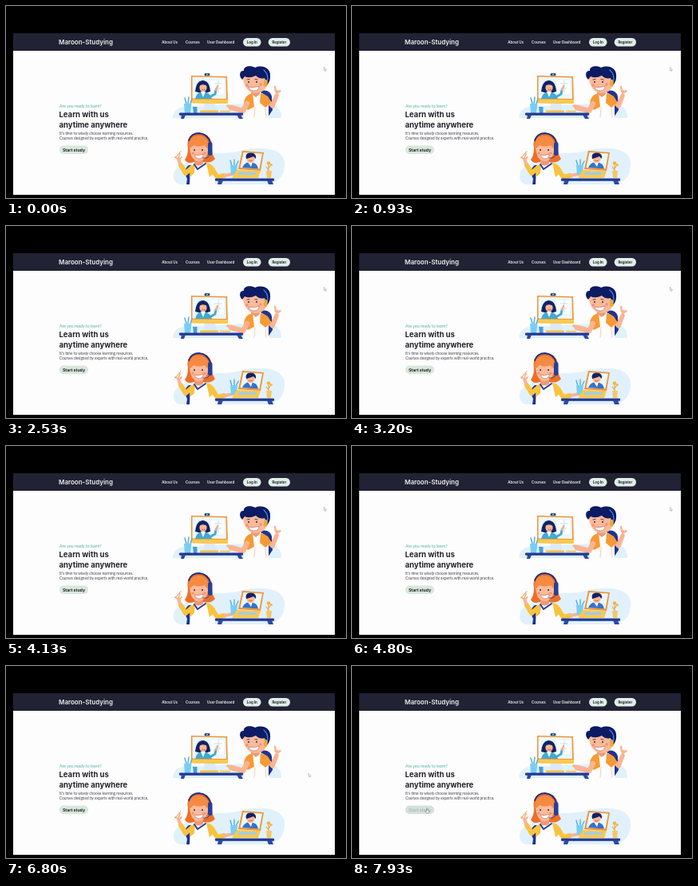
Animation, 426 px wide and 240 px high, one loop 8000 ms. Source, as an HTML page:

```html
<!DOCTYPE html>
<html lang="en">
<head>
<meta charset="utf-8">
<title>Learning page</title>
<style>
  html, body { margin: 0; width: 100%; height: 100%; overflow: hidden; background: #000; }
  svg { display: block; width: 100vw; height: 100vh; }
  text { font-family: Inter, "Open Sans", sans-serif; font-weight: 700; fill: #222228; }
  .nav { font-size: 4.4px; font-weight: 600; fill: #f4f4f6; }
  .pill { font-size: 4.4px; text-anchor: middle; }
  .small { font-family: Lato, "Open Sans", sans-serif; font-size: 4.75px; font-weight: 400; fill: #44444c; }
  .line { fill: none; stroke-linecap: round; stroke-linejoin: round; }
</style>
</head>
<body>
<svg viewBox="0 0 426 240">
  <rect width="426" height="240" fill="#000"/>
  <rect x="9" y="34" width="403" height="202" fill="#fdfdfe"/>

  <g id="header">
    <rect x="9" y="34" width="403" height="22" fill="#212233"/>
    <text x="66" y="48" font-size="8" style="fill:#f1f1f4;font-weight:600">Maroon-Studying</text>
    <text class="nav" x="195.3" y="46.8">About Us</text>
    <text class="nav" x="225" y="46.8">Courses</text>
    <text class="nav" x="252" y="46.8">User Dashboard</text>
    <rect x="297" y="40" width="22.5" height="10.5" rx="5.2" fill="#dfeee8"/>
    <text class="pill" x="308.2" y="46.8">Log In</text>
    <rect x="328.7" y="40" width="27.3" height="10.5" rx="5.2" fill="#dfeee8"/>
    <text class="pill" x="342.3" y="46.8">Register</text>
  </g>

  <g id="intro">
    <text class="small" x="67" y="126.6" style="font-size:5.2px;fill:#4fae9d">Are you ready to learn?</text>
    <text x="66.5" y="139.2" font-size="9.5">Learn with us</text>
    <text x="66.5" y="151.6" font-size="9.5">anytime anywhere</text>
    <text class="small" x="67" y="161.2">It's time to wisely choose learning resources.</text>
    <text class="small" x="67" y="166.8">Courses designed by experts with real-world practice.</text>
    <rect id="button" x="67" y="174.5" width="36" height="10.5" rx="5"/>
    <text id="label" x="85" y="181.6" font-size="5.2" text-anchor="middle">Start study</text>
  </g>

  <g id="tutor">
    <path d="M209 140C210 128 220 124 237 125L322 121C338 121 346 129 345 140Z" fill="#e0f1fc"/>
    <path d="M316 107Q330 102 333 113L334 130L328 139H314Z" fill="#1f3391"/>
    <path class="line" d="M327 118L334 125L339 112" stroke="#f9b493" stroke-width="5.5"/>
    <path class="line" d="M339 111L340 106M338 107L337 101M341 108L343.5 106" stroke="#f9b493" stroke-width="2.4"/>
    <path d="M298 140L300 117Q302 109 311 108H319Q329 112 329 123V140Z" fill="#fdfdff"/>
    <path d="M298 124Q298 111 309 109L311 126L303 130ZM319 109Q329 110 332 121L325 127L318 121Z" fill="#f79a34"/>
    <path class="line" d="M302 122L297 131L282 127" stroke="#f9b493" stroke-width="6.5"/>
    <path class="line" d="M283 126L278 125" stroke="#f9b493" stroke-width="3.5"/>
    <path class="line" d="M312 127L311 139M325 128L326 139" stroke="#f9cfa5" stroke-width="1"/>
    <path d="M307 104H318V110L313 114L307 109Z" fill="#ee9876"/>
    <path d="M297 92Q297 82 310 82Q326 82 327 94Q327 108 313 109Q300 108 297 92Z" fill="#fcba98"/>
    <path d="M296 92C291 87 293 80 298 81C297 75 307 74 312 77C322 73 331 78 331 86Q332 93 327 99L324 90Q318 92 313 87Q305 91 299 88Z" fill="#0d1b64"/>
    <path class="line" d="M323 80Q330 86 327 96" stroke="#4689dc" stroke-width="1.2"/>
    <rect x="323" y="92" width="4.5" height="9" rx="2.2" fill="#f0a738"/>
    <g fill="#1b2861"><circle cx="304" cy="95" r="1"/><circle cx="314" cy="95" r="1"/></g>
    <path class="line" d="M302 92L305 91.5M312 91.5L315 92" stroke="#1b2861" stroke-width=".8"/>
    <path d="M304 101Q310 103 317 100Q317 106 311 106Q305 106 304 101Z" fill="#fff" stroke="#bd5b51" stroke-width=".6"/>
    <g fill="#f48c78"><circle cx="302" cy="99" r="1.7"/><circle cx="319" cy="98" r="1.7"/></g>

    <path d="M249 121H262L264 132H247Z" fill="#dceaf5"/>
    <rect x="243" y="130.5" width="23" height="2.8" rx="1" fill="#f6bf48"/>
    <path d="M232 87L277 88L278 122L232 121Z" fill="#f39332"/>
    <path d="M233.5 88.5L275.5 89.5L276 116L233.5 115.5Z" fill="#eaf8fd"/>
    <path d="M232 116.5L278 117V122L232 121.5Z" fill="#fbc84f"/>
    <path d="M257 93H273V110H257Z" fill="#fff"/>
    <path class="line" d="M261 97H270M266 93V108M261 103H269" stroke="#b8dff0" stroke-width=".9"/>
    <path d="M237 107Q238 94 246 93Q255 93 256 107Q247 110 237 107Z" fill="#122267"/>
    <path d="M237 116Q239 107 247 107Q256 108 258 116Z" fill="#45a9d2"/>
    <path d="M244 107H250L247 114Z" fill="#fff"/>
    <ellipse cx="247" cy="102" rx="4.6" ry="5.3" fill="#fbb893"/>
    <path d="M241 101Q245 96 253 100L251 95L243 95Z" fill="#122267"/>
    <path class="line" d="M255 114L262 110L263 105" stroke="#45a9d2" stroke-width="3"/>
    <path class="line" d="M263 105L265 100" stroke="#f8ab85" stroke-width="2.2"/>
    <path d="M245 104Q248 106 250 104" fill="none" stroke="#c45b4b" stroke-width=".8"/>
    <rect x="248.5" y="84" width="7" height="3.2" rx="1.5" fill="#29477f"/>
    <circle cx="252" cy="85.6" r="1.1" fill="#69d0c4"/>
    <path class="line" d="M226 122L224 115M228 122L229 114M231 122L233 116" stroke="#56aee5" stroke-width="1.5"/>
    <path d="M223 122H232.5L231 134H224Z" fill="#79cef5"/>
    <path d="M234 126H239.5V134H235Z" fill="#4b9ed7"/>
    <path class="line" d="M269 131.7H280" stroke="#f7c555" stroke-width="2"/>
    <rect x="217" y="133.5" width="80" height="3.2" rx="1" fill="#22388f"/>
    <path d="M220 136H225L223 141H219ZM289 136H294L297 141H292Z" fill="#2d49a5"/>
  </g>

  <g id="student">
    <path d="M210 214C210 199 224 198 238 191C253 180 278 187 296 180C320 175 347 177 349 195C350 211 342 222 325 223H218Q211 222 210 214Z" fill="#e0f1fc"/>
    <path d="M229 199Q221 205 227 216L226 223H254L257 199Z" fill="#1f3391"/>
    <path class="line" d="M233 202L225 209L219 199" stroke="#f9c33e" stroke-width="6"/>
    <path class="line" d="M218 197L216 191" stroke="#f9b493" stroke-width="4"/>
    <path class="line" d="M215 191L212 189M216 190L218 184.5M217 192L220 189" stroke="#f9b493" stroke-width="1.8"/>
    <path class="line" d="M212 190L219 181.5" stroke="#f09a36" stroke-width="1"/>
    <path d="M230 223L231 201Q238 193 252 196Q261 199 262 223Z" fill="#fdfdff"/>
    <path d="M231 201L237 196L236 209L230 214ZM251 196Q260 197 263 207L255 214Z" fill="#f9c33e"/>
    <path class="line" d="M236 198L240 204L250 197" stroke="#273b99" stroke-width="2"/>
    <path d="M228 178C226 165 231 159 242 159C254 159 259 168 258 178Q258 186 262 191Q257 197 247 195H235Q227 198 224 192Q228 187 228 178Z" fill="#ed6f29"/>
    <path d="M236 190H247V197Q241 202 236 197Z" fill="#ee9876"/>
    <path d="M230 176Q231 167 242 167Q254 168 253 180Q252 193 241 194Q231 193 230 176Z" fill="#fcba98"/>
    <path d="M229 178Q228 163 241 162Q254 162 255 179Q251 178 249 174Q242 177 235 174Q233 177 229 178Z" fill="#f58b42"/>
    <path class="line" d="M229 168Q232 159 242 159Q253 160 256 171" stroke="#1c2f84" stroke-width="1.8"/>
    <rect x="253" y="170" width="5.5" height="17" rx="2.7" fill="#24409a"/>
    <path class="line" d="M255 186Q254 191 247 190" stroke="#24409a" stroke-width=".9"/>
    <g fill="#1b2861"><circle cx="236" cy="180" r="1"/><circle cx="246" cy="180" r="1"/></g>
    <path d="M236 186Q241 188 247 185Q247 191 241 191Q237 190 236 186Z" fill="#fff" stroke="#bd5b51" stroke-width=".6"/>
    <g fill="#f48c78"><circle cx="234" cy="184" r="1.6"/><circle cx="249" cy="184" r="1.6"/></g>
    <path class="line" d="M258 204L265 214L273 212" stroke="#f9c33e" stroke-width="6"/>
    <path class="line" d="M274 212L284 210" stroke="#f9b493" stroke-width="4"/>
    <path class="line" d="M283 200L281 193M286 200V192M288 200L291 194" stroke="#56aee5" stroke-width="1.4"/>
    <path d="M281 199H290L289 211H282Z" fill="#79cef5"/>
    <path d="M296 181L323 183L319 206L291 204Z" fill="#f39332"/>
    <path d="M297.5 183L321 184.5L317.5 203.5L293.5 202Z" fill="#eaf8fd"/>
    <path d="M296 202Q299 195 306 195Q315 196 316 203.4Z" fill="#3971c9"/>
    <path d="M303 195H309L307 201Z" fill="#fff"/>
    <ellipse cx="306.5" cy="190.5" rx="5.2" ry="5.4" fill="#fbb893"/>
    <path d="M301 191Q299 183 307 183.5Q314 183.5 313 191L310 188Q305 190 301 191Z" fill="#122267"/>
    <path d="M304 193Q306 195 309 193" fill="none" stroke="#c45b4b" stroke-width=".8"/>
    <path d="M289 205L319 206L316 215H283Z" fill="#fbc84f"/>
    <path d="M292 207.5L314 208L313 211H290Z" fill="#9fcdeb"/>
    <path class="line" d="M329 207V197M329 203L332 199M329 205L326 201" stroke="#e7a541" stroke-width="1.1"/>
    <g fill="#f8b43a"><circle cx="329" cy="196.5" r="2.3"/><circle cx="332.3" cy="198.5" r="1.5"/></g>
    <path d="M326 206H333L332 215H327Z" fill="#f8c665"/>
    <rect x="262" y="215.5" width="74" height="3.2" rx="1" fill="#22388f"/>
    <path d="M266 218H272L270 223H265ZM327 218H333L335 223H329Z" fill="#2d49a5"/>
  </g>

  <path id="arrow" d="M0 0V4.2L1 3.4L1.8 5L2.5 4.6L1.8 3.1H3Z" fill="#fff" stroke="#8f8a7c" stroke-width=".45"/>
  <path id="hand" d="M-.5-2.4Q.4-3.2.7-2V-.3L2.6.2V2L1.9 3.4H-.6L-2.1 1.2L-.5.9Z" fill="#fff" stroke="#555b60" stroke-width=".5"/>
</svg>
<script>
  const LOOP = 8000;
  const STOPS = [[6560, 398.5, 76.5], [6800, 379, 134], [7650, 94, 180.5]];
  const byId = id => document.getElementById(id);
  const arrow = byId("arrow"), hand = byId("hand");
  const button = byId("button"), label = byId("label");
  const ease = p => p * p * (3 - 2 * p);

  function pointer(t) {
    let [start, x, y] = STOPS[0];
    for (const [end, nx, ny] of STOPS.slice(1)) {
      if (t <= start) break;
      const p = ease(Math.min(1, (t - start) / (end - start)));
      if (t < end) return [x + (nx - x) * p, y + (ny - y) * p];
      [start, x, y] = [end, nx, ny];
    }
    return [x, y];
  }

  function draw(t) {
    const [x, y] = pointer(t);
    const over = x > 67 && x < 103 && y > 174 && y < 185;
    for (const shape of [arrow, hand]) shape.setAttribute("transform", `translate(${x} ${y})`);
    arrow.style.display = over ? "none" : "";
    hand.style.display = over ? "" : "none";
    button.style.fill = over ? "#d2e1dc" : "#d8e8dc";
    label.style.fill = over ? "#a9bcb5" : "#222228";
  }

  function tick(now) {
    draw(now % LOOP);
    requestAnimationFrame(tick);
  }
  draw(0);
  requestAnimationFrame(tick);
</script>
</body>
</html>
```
